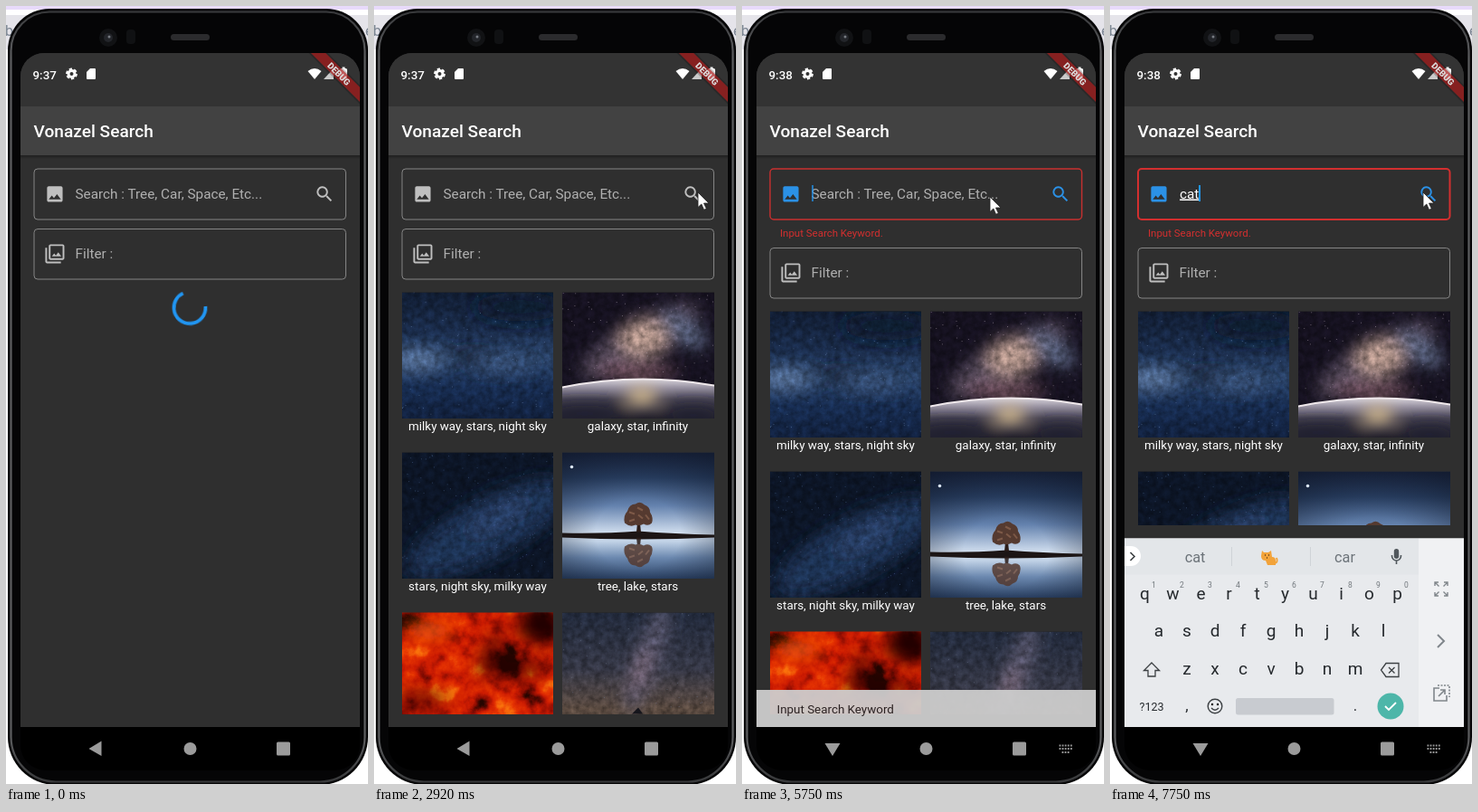
These frames come from a looping animation (400 px wide and 860 px high, 8 s). An HTML page:

```html
<!DOCTYPE html>
<html lang="en">
<head>
<meta charset="utf-8">
<title>Image search app</title>
<style>
html, body { margin: 0; width: 100%; height: 100%; overflow: hidden; background: #fff; }
svg { display: block; }
#stage { width: 100vw; height: 100vh; font-family: Roboto, sans-serif; }
.field { font-size: 15.3px; }
.caption { font-size: 13.4px; fill: #fff; text-anchor: middle; }
.mid { text-anchor: middle; }
.box { fill: none; stroke: #858585; stroke-width: 1; }

/* Percentages are ms / 80 on the 8 s loop */
.t { animation: 8s step-end infinite; }
.spin { animation-name: spin; }
.captions { animation-name: captions; }
.photos { animation-name: photos; }
.mouse { animation-name: mouse; }
.below { animation-name: below; }
.error { animation-name: error; }
.ripple { animation-name: ripple; }
.border { animation-name: border; }
.snack { animation-name: snack; }
.snackText { animation-name: snackText; }
.before38 { animation-name: before38; }
.after38 { animation-name: after38; }
.accent { fill: #bfbfbf; animation-name: accent; }
.navBack { animation-name: navBack; }
.navDown { animation-name: navDown; }
.keyboard { animation-name: keyboard; }
.caret { animation-name: caret; }
.hint { animation-name: hint; }
.typed1 { animation-name: typed1; }
.typed2 { animation-name: typed2; }
.typed3 { animation-name: typed3; }
.words0 { animation-name: words0; }
.words1 { animation-name: words1; }

@keyframes spin {
  0% { transform: rotate(-5deg); stroke-dasharray: 250 110; }
  1% { transform: rotate(42deg); stroke-dasharray: 240 120; }
  2.125% { transform: rotate(95deg); stroke-dasharray: 215 145; }
  3.125% { transform: rotate(145deg); stroke-dasharray: 180 180; }
  6.25%, 100% { opacity: 0; }
}
@keyframes captions { 0% { opacity: 0 } 6.25% { opacity: 1 } }
@keyframes photos { 0% { opacity: 0 } 12.5% { opacity: 1 } }
@keyframes below { 42.75%, 100% { transform: translateY(21px) } }
@keyframes error {
  0% { opacity: 0; transform: translateY(-1.5px) }
  42.75% { opacity: .8; transform: translateY(-1.5px) }
  43.75% { opacity: 1; transform: none }
}
@keyframes ripple { 0% { opacity: 0 } 42.75% { opacity: 1 } 43.75% { opacity: .45 } 44.75%, 100% { opacity: 0 } }
@keyframes border {
  42.75% { stroke: #c9302f; stroke-width: 1 }
  71.875% { stroke: #c9302f; stroke-width: 1.4 }
  72.875%, 100% { stroke: #d32f2f; stroke-width: 2 }
}
@keyframes snack {
  0% { opacity: 0; transform: translateY(5px) }
  42.75% { opacity: 1; transform: translateY(5px) }
  43.75% { opacity: 1; transform: none }
  72.875%, 100% { opacity: 0 }
}
@keyframes snackText { 0% { opacity: 0 } 43.75% { opacity: .6 } 44.75% { opacity: 1 } }
@keyframes before38 { 47.875%, 100% { opacity: 0 } }
@keyframes after38 { 0% { opacity: 0 } 47.875% { opacity: 1 } }
@keyframes accent { 70.875%, 100% { fill: #2b91e6 } }
@keyframes navBack { 71.875%, 100% { opacity: 0 } }
@keyframes navDown { 0% { opacity: 0 } 71.875% { opacity: 1 } }
@keyframes keyboard {
  0% { opacity: 0 }
  72.875% { opacity: 1; transform: translateY(90px) }
  74% { opacity: 1; transform: translateY(24px) }
  75% { opacity: 1; transform: none }
}
@keyframes caret {
  0% { opacity: 0 }
  70.875% { opacity: 1; transform: none }
  71.875% { opacity: .7; transform: none }
  74% { opacity: 0; transform: none }
  77.125% { opacity: 1; transform: none }
  82.25% { opacity: 1; transform: translateX(8px) }
  83.375% { opacity: 1; transform: translateX(16px) }
  84.375% { opacity: 1; transform: translateX(21px) }
  89.625% { opacity: 0; transform: translateX(21px) }
  95.875%, 100% { opacity: 1; transform: translateX(21px) }
}
@keyframes hint { 82.25%, 100% { opacity: 0 } }
@keyframes typed1 { 0% { opacity: 0 } 82.25% { opacity: 1 } 83.375%, 100% { opacity: 0 } }
@keyframes typed2 { 0% { opacity: 0 } 83.375% { opacity: 1 } 84.375%, 100% { opacity: 0 } }
@keyframes typed3 { 0% { opacity: 0 } 84.375% { opacity: 1 } }
@keyframes words0 { 80.25%, 100% { opacity: 0 } }
@keyframes words1 { 0% { opacity: 0 } 80.25% { opacity: 1 } 83.375%, 100% { opacity: 0 } }
@keyframes mouse {
  0% { transform: translate(420px, 150px) }
  27.125% { transform: translate(392px, 176px) }
  28.125% { transform: translate(384px, 182px) }
  29.125% { transform: translate(374px, 191px) }
  30.25% { transform: translate(364px, 200px) }
  31.25% { transform: translate(358px, 205px) }
  33.375% { transform: translate(358px, 206px) }
  61.5% { transform: translate(346px, 208px) }
  62.5% { transform: translate(316px, 211px) }
  63.5% { transform: translate(287px, 212px) }
  64.625% { transform: translate(274px, 211px) }
  91.625% { transform: translate(300px, 214px) }
  92.75% { transform: translate(336px, 218px) }
  93.75% { transform: translate(364px, 216px) }
  95.875% { transform: translate(351px, 209px) }
  96.875%, 100% { transform: translate(346px, 206px) }
}
</style>
</head>
<body>
<svg id="stage" viewBox="0 0 400 860">
<defs>
  <clipPath id="screen"><path d="M16 797V78a26 26 0 0 1 26-26H365a26 26 0 0 1 26 26V797z"/></clipPath>
  <clipPath id="list"><rect x="16" y="290" width="375" height="493"/></clipPath>
  <filter id="soft" x="-60%" y="-60%" width="220%" height="220%"><feGaussianBlur stdDeviation="9"/></filter>
  <filter id="grain" x="0" y="0" width="100%" height="100%" color-interpolation-filters="sRGB">
    <feTurbulence type="fractalNoise" baseFrequency=".14" numOctaves="4" seed="4"/>
    <feColorMatrix values="1 0 0 0 0 1 0 0 0 0 1 0 0 0 0 0 0 0 0 1" result="n"/>
    <feComposite in="SourceGraphic" in2="n" operator="arithmetic" k1=".8" k2=".6"/>
  </filter>
  <filter id="fire" x="0" y="0" width="100%" height="100%" color-interpolation-filters="sRGB">
    <feTurbulence type="fractalNoise" baseFrequency=".03" numOctaves="5" seed="9"/>
    <feColorMatrix values="1.8 0 0 0 -.4 1.8 0 0 0 -.4 1.8 0 0 0 -.4 0 0 0 0 1"/>
    <feComponentTransfer>
      <feFuncR type="table" tableValues=".15 .55 .8 .9 .98"/>
      <feFuncG type="table" tableValues=".02 .05 .11 .2 .45"/>
      <feFuncB type="table" tableValues="0 .01 .01 .01 .05"/>
    </feComponentTransfer>
  </filter>
  <linearGradient id="rim" x2="0" y2="1"><stop stop-color="#3a3b3d"/><stop offset=".06" stop-color="#5d5e60"/><stop offset=".94" stop-color="#5d5e60"/><stop offset="1" stop-color="#38393b"/></linearGradient>
  <linearGradient id="milky" x2="0" y2="1"><stop stop-color="#111d33"/><stop offset=".3" stop-color="#1a2c4b"/><stop offset=".52" stop-color="#2a4266"/><stop offset=".75" stop-color="#172c50"/><stop offset="1" stop-color="#11203d"/></linearGradient>
  <linearGradient id="planet" x2="0" y2="1"><stop stop-color="#d6d2da"/><stop offset=".22" stop-color="#9690a0"/><stop offset=".5" stop-color="#4c4858"/><stop offset="1" stop-color="#1c1a26"/></linearGradient>
  <linearGradient id="sky" x2="0" y2="1"><stop stop-color="#1b2743"/><stop offset=".2" stop-color="#2c4469"/><stop offset=".42" stop-color="#6482ae"/><stop offset=".64" stop-color="#d3e0f0"/><stop offset=".7" stop-color="#c3d4e8"/><stop offset=".83" stop-color="#6c89b0"/><stop offset="1" stop-color="#2a4164"/></linearGradient>
  <radialGradient id="vignette" cx=".5" cy=".64" r=".8"><stop offset=".35" stop-color="#0d1424" stop-opacity="0"/><stop offset="1" stop-color="#0d1424" stop-opacity=".6"/></radialGradient>
  <linearGradient id="dusk" x2="0" y2="1"><stop stop-color="#222a3c"/><stop offset=".45" stop-color="#353745"/><stop offset=".76" stop-color="#5a4a40"/><stop offset="1" stop-color="#2b2524"/></linearGradient>
  <linearGradient id="shade" x2="0" y2="1"><stop stop-color="#000" stop-opacity=".35"/><stop offset="1" stop-color="#000" stop-opacity="0"/></linearGradient>
  <path id="imageIcon" d="M21 19V5c0-1.1-.9-2-2-2H5c-1.1 0-2 .9-2 2v14c0 1.1.9 2 2 2h14c1.1 0 2-.9 2-2zM8.5 13.5l2.5 3.01L14.5 12l4.5 6H5z"/>
  <path id="searchIcon" d="M15.5 14h-.79l-.28-.27A6.5 6.5 0 1 0 13.73 14.43l.27.28v.79l5 4.99L20.49 19zm-6 0a4.5 4.5 0 1 1 0-9 4.5 4.5 0 0 1 0 9z"/>
  <path id="filterIcon" d="M15.96 10.29l-2.75 3.54-1.96-2.36L8.5 15h11zM3 5H1v16c0 1.1.9 2 2 2h16v-2H3zM21 1H7c-1.1 0-2 .9-2 2v14c0 1.1.9 2 2 2h14c1.1 0 2-.9 2-2V3c0-1.1-.9-2-2-2zm0 16H7V3h14z"/>
</defs>

<!-- Desktop behind the phone -->
<rect width="400" height="860" fill="#fff"/>
<rect width="400" height="4" fill="#e8dafb"/>
<rect y="10" width="400" height="38" fill="#e5e4ea"/>
<text x="-1" y="33" font-size="16" fill="#7b8592">b</text>
<text x="397" y="33" font-size="16" fill="#7b8592">e</text>

<!-- Phone body -->
<path d="M2 49A46 46 0 0 1 48 3H354A46 46 0 0 1 400 49V808A53 53 0 0 1 347 861H55A53 53 0 0 1 2 808z" fill="#060607"/>
<path d="M5.500 50A43 43 0 0 1 48 6.500H354A43 43 0 0 1 396.500 50V808A50 50 0 0 1 347 857.500H55A50 50 0 0 1 5.500 808z" fill="#050506" stroke="url(#rim)" stroke-width="2.200"/>
<circle cx="113" cy="35" r="10" fill="#111214"/><circle cx="113" cy="35" r="5" fill="#23252a"/><circle cx="114" cy="34" r="1.500" fill="#777b82"/>
<rect x="133" y="26" width="10" height="16" rx="4" fill="#101113"/>
<rect x="182" y="31" width="43" height="7" rx="3.500" fill="#2b2b2d"/>

<g clip-path="url(#screen)">
  <rect x="16" y="52" width="375" height="745" fill="#2f2f2f"/>
  <rect x="16" y="52" width="375" height="59" fill="#333"/>
  <rect x="16" y="111" width="375" height="54" fill="#424242"/>
  <rect x="16" y="165" width="375" height="4" fill="url(#shade)"/>

  <!-- Status bar -->
  <g fill="#fff">
    <g font-size="13.400" font-weight="500">
      <text class="t before38" x="29.500" y="80.500">9:37</text>
      <text class="t after38" x="29.500" y="80.500">9:38</text>
    </g>
    <circle cx="72.500" cy="75" r="3.500" fill="none" stroke="#fff" stroke-width="3"/>
    <circle cx="72.500" cy="75" r="5.400" fill="none" stroke="#fff" stroke-width="2" pathLength="12" stroke-dasharray="1.200 .8"/>
    <path d="M93 69h5q1 0 1 1v10q0 1-1 1h-8q-1 0-1-1V73z"/>
    <path d="M333.500 72q7.500-6 15 0l-7.500 9z"/>
    <path d="M351 81l11-12v12z" opacity=".75"/>
    <rect x="369" y="69" width="8" height="12" rx="1.500"/><rect x="371.500" y="67.500" width="3" height="2"/>
  </g>
  <g transform="translate(368 75) rotate(45)">
    <rect x="-45" y="-7.500" width="90" height="15" fill="#000" opacity=".2"/>
    <rect x="-45" y="-5.800" width="90" height="11.500" fill="#b71c1c" opacity=".66"/>
    <text class="mid" y="3.500" font-size="9.700" font-weight="900" fill="#ddd">DEBUG</text>
  </g>
  <text x="30.500" y="145" font-size="19.100" font-weight="500" fill="#fff">Vonazel Search</text>

  <!-- Search field -->
  <rect class="t box border" x="31" y="180" width="344.500" height="56" rx="4"/>
  <g class="t accent" transform="translate(42.500 196.500) scale(.955)"><use href="#imageIcon"/></g>
  <g class="t accent" transform="translate(340.500 196.500) scale(.955)"><use href="#searchIcon"/></g>
  <circle class="t ripple" cx="352" cy="208" r="33" fill="#fff" fill-opacity=".065"/>
  <g class="field">
    <text class="t hint" x="76.500" y="213" fill="#b0b0b0">Search : Tree, Car, Space, Etc...</text>
    <g fill="#fff" text-decoration="underline">
      <text class="t typed1" x="77" y="212.500">c</text>
      <text class="t typed2" x="77" y="212.500">ca</text>
      <text class="t typed3" x="77" y="212.500">cat</text>
    </g>
  </g>
  <rect class="t caret" x="77" y="198" width="2" height="18" fill="#2196f3"/>
  <text class="t error" x="42" y="255" font-size="11.460" fill="#d32f2f">Input Search Keyword.</text>

  <g class="t below">
    <rect class="box" x="31" y="246.500" width="344.500" height="55.500" rx="4"/>
    <use href="#filterIcon" fill="#bfbfbf" transform="translate(42.500 262.500) scale(.955)"/>
    <text class="field" x="76.500" y="279" fill="#b0b0b0">Filter :</text>
  </g>
  <g transform="translate(203 333.500)">
    <circle class="t spin" r="17.500" pathLength="360" fill="none" stroke="#2196f3" stroke-width="3.800"/>
  </g>

  <!-- Results -->
  <g clip-path="url(#list)"><g class="t below">
    <g class="t captions" id="captions"></g>
    <g class="t photos">
      <svg x="31" y="316.500" width="167" height="139.500">
        <g filter="url(#grain)">
          <rect width="167" height="140" fill="url(#milky)"/>
          <g filter="url(#soft)">
            <ellipse cx="16" cy="75" rx="30" ry="11" fill="#587299"/>
            <ellipse cx="112" cy="80" rx="34" ry="7" fill="#3a5279"/>
            <ellipse cx="72" cy="70" rx="22" ry="7" fill="#161d2e"/>
            <ellipse cx="130" cy="16" rx="50" ry="16" fill="#101b30"/>
          </g>
        </g>
        <path class="stars" data-count="80" stroke="#6a86b2"/>
      </svg>
      <svg x="208" y="316.500" width="168" height="139.500">
        <g filter="url(#grain)">
          <rect width="168" height="140" fill="#15111f"/>
          <g filter="url(#soft)">
            <ellipse cx="86" cy="54" rx="74" ry="22" fill="#55485a" transform="rotate(-30 86 54)"/>
            <ellipse cx="134" cy="42" rx="30" ry="13" fill="#56607c" transform="rotate(35 134 42)"/>
            <ellipse cx="90" cy="50" rx="27" ry="20" fill="#b3958a"/>
            <ellipse cx="84" cy="88" rx="44" ry="7" fill="#7d5762"/>
          </g>
        </g>
        <path class="stars" data-count="110" stroke="#b8a9b8"/>
        <path d="M0 105Q84 88 168 103V140H0z" fill="url(#planet)"/>
        <g filter="url(#soft)">
          <ellipse cx="25" cy="134" rx="48" ry="12" fill="#242131"/><ellipse cx="145" cy="136" rx="34" ry="12" fill="#242131"/>
          <ellipse cx="88" cy="115" rx="18" ry="9" fill="#e3c692"/>
        </g>
        <path d="M0 105Q84 88 168 103" fill="none" stroke="#f0e9ec" stroke-width="2"/>
      </svg>
      <svg x="31" y="493.500" width="167" height="139.500">
        <g filter="url(#grain)">
          <rect width="167" height="140" fill="#0c1526"/>
          <g filter="url(#soft)">
            <ellipse cx="95" cy="84" rx="100" ry="32" fill="#1c3052" transform="rotate(-28 95 84)"/>
            <ellipse cx="105" cy="72" rx="40" ry="11" fill="#2a4168" transform="rotate(-28 105 72)"/>
          </g>
        </g>
        <path class="stars" data-count="130" stroke="#4f6c9b"/>
      </svg>
      <svg x="208" y="493.500" width="168" height="139.500">
        <rect width="168" height="140" fill="url(#sky)"/>
        <rect width="168" height="140" fill="url(#vignette)"/>
        <path d="M0 89q45 1 84-2 40 3 84 4v3Q85 98 0 94z" fill="#1c1515"/>
        <circle cx="10.500" cy="16" r="1.800" fill="#dbe6f5"/>
        <g id="tree">
          <path d="M82 88l1.500-14h2l1.500 14z" fill="#2b1c18"/>
          <path d="M69 78q-2-8 3-13 2-8 9-8 5-4 10 1 6 2 6 8 4 6 2 12-4 4-9 1-5 3-9 1-6 3-12-2z" fill="#553a30"/>
          <path d="M74 66l6 2m3-7l6 3m3 5l4 5m-22 2l6-2m4-5l5 4" stroke="#7d5947" stroke-width="2"/>
        </g>
        <use href="#tree" transform="translate(0 182) scale(1 -1)" opacity=".85"/>
      </svg>
      <svg x="31" y="670.500" width="167" height="139.500">
        <rect width="167" height="140" filter="url(#fire)"/>
        <g filter="url(#soft)" fill="#230602">
          <ellipse cx="154" cy="14" rx="26" ry="20"/>
          <ellipse cx="98" cy="46" rx="8" ry="26" transform="rotate(25 98 46)" opacity=".8"/>
          <ellipse cx="124" cy="62" rx="36" ry="8" opacity=".75"/>
          <ellipse cx="20" cy="96" rx="30" ry="9" opacity=".6"/>
          <ellipse cx="30" cy="20" rx="26" ry="9" fill="#f26a10" opacity=".8"/>
        </g>
      </svg>
      <svg x="208" y="670.500" width="168" height="139.500">
        <g filter="url(#grain)">
          <rect width="168" height="140" fill="url(#dusk)"/>
          <g filter="url(#soft)" transform="rotate(20 92 56)"><ellipse cx="92" cy="50" rx="13" ry="62" fill="#57546b"/><ellipse cx="90" cy="66" rx="6" ry="26" fill="#806a78"/></g>
        </g>
        <path class="stars" data-count="60" stroke="#6f7890"/>
        <path d="M77 112l7-7 5 7z" fill="#15151c"/>
      </svg>
    </g>
  </g></g>

  <g class="t snack">
    <rect x="16" y="756" width="375" height="60" fill="#cdcdcd" fill-opacity=".95"/>
    <text class="t snackText" x="38.500" y="781.500" font-size="13.400" fill="#2b2222">Input Search Keyword</text>
  </g>

  <!-- Soft keyboard -->
  <g class="t keyboard">
    <rect x="16" y="574" width="375" height="15" fill="#2f2f2f"/>
    <rect x="16" y="588.500" width="375" height="210" fill="#e8eaed"/>
    <rect x="16" y="588.500" width="325" height="40" fill="#e3e6e9"/>
    <rect x="341" y="588.500" width="50" height="210" fill="#f0f1f3"/>
    <path d="M16 597h7a11 11 0 0 1 0 22h-7z" fill="#fff"/>
    <path d="M134.500 598v21M221.500 598v21" stroke="#cfd3d7"/>
    <g fill="none" stroke="#3c4043" stroke-width="1.600">
      <path d="M22.500 604l4.500 4.500-4.500 4.500"/>
      <path d="M311.500 607v1a5 5 0 0 0 10 0v-1M316.500 613v4" stroke="#50575c"/>
      <path d="M46 726l8.500 8.500H50V741h-8v-6.500h-4.500zM305 726.500h14v15h-14l-5.500-7.500zM308 731l6.500 6.500m0-6.500L308 737.500" stroke-width="1.300"/>
      <circle cx="116" cy="774" r="7.800" stroke-width="1.400"/><path d="M112 776q4 4.500 8 0" stroke-width="1.300"/>
      <path d="M362 695l7 7-7 7" stroke="#80868b" stroke-width="2"/>
      <path d="M359 641v-4h4m6 0h4v4m0 7v4h-4m-6 0h-4v-4m0-11l4.500 4.500m9.500-4.500l-4.500 4.500m4.500 10.500l-4.500-4.500m-9.500 4.500l4.500-4.500" stroke="#80868b" stroke-width="1.400"/>
      <path d="M364 754h-6v14h14v-6M363 763l7-7m-5 0h5v5" stroke="#80868b"/>
      <path d="M362 751h13v13" stroke="#80868b" stroke-dasharray="2 1.500"/>
    </g>
    <rect x="313.800" y="600" width="5.400" height="11" rx="2.700" fill="#50575c"/>
    <circle cx="113" cy="772" r="1.200"/><circle cx="119" cy="772" r="1.200"/>
    <rect x="139" y="765" width="108.500" height="18.500" rx="2.500" fill="#c8cbd0"/>
    <circle cx="310" cy="774" r="14.500" fill="#4db6a9"/>
    <path d="M304 774l4 4 8-8" fill="none" stroke="#fff" stroke-width="1.800"/>
    <g class="mid" fill="#6b7278" font-size="16.300" id="words">
      <g class="t typed3" fill="#f2a33a">
        <path d="M168 602l2 2h5l3-2 1 7q4 0 4 4v5h-9l-2-5q-5 0-5-5z"/>
        <path d="M182 616q4-1 2-6" fill="none" stroke="#f2a33a" stroke-width="2"/>
        <path d="M171 607h1m3 0h1m-3 3h1" stroke="#5c3a18" stroke-width="1.500"/>
      </g>
    </g>
    <g class="mid" fill="#25292d" id="keys"></g>
  </g>
</g>

<!-- Navigation bar -->
<path d="M16 797H391V817a28 28 0 0 1-28 28H44a28 28 0 0 1-28-28z"/>
<g fill="#9b9b9b">
  <path class="t navBack" d="M91.500 821L105.500 812.500V829z"/>
  <g class="t navDown">
    <path d="M91.500 815H108.500L100 829z"/>
    <path d="M350.500 817.500h15M350.500 821h15M353.500 825h9" stroke="#9b9b9b" stroke-width="1.800" stroke-dasharray="1.800 1.300"/>
  </g>
  <circle cx="203.500" cy="821" r="7"/>
  <rect x="299" y="813.500" width="15" height="15" rx="1.500"/>
</g>

<g class="t mouse"><path d="M0 0V16.500L3.800 13 6.600 19.300 9.300 18 6.500 12H12z" fill="#fff" stroke="#222" stroke-width=".8"/></g>
</svg>
<script>
const $ = selector => document.querySelector(selector);

function addText(parent, text, x, y, attrs = {}) {
  const el = document.createElementNS("http://www.w3.org/2000/svg", "text");
  for (const [key, value] of Object.entries({ x, y, ...attrs })) el.setAttribute(key, value);
  el.textContent = text;
  parent.append(el);
}

const captions = ["milky way, stars, night sky", "galaxy, star, infinity", "stars, night sky, milky way", "tree, lake, stars"];
captions.forEach((text, i) =>
  addText($("#captions"), text, i % 2 ? 291.5 : 114.5, 469 + 177 * (i >> 1), { class: "caption" }));

const rows = [["qwertyuiop", 38.5, 656], ["asdfghjkl", 54, 697], ["zxcvbnm", 85, 739]];
for (const [letters, x, y] of rows) {
  [...letters].forEach((letter, i) => {
    addText($("#keys"), letter, x + 31 * i, y, { "font-size": 19 });
    if (y === 656) addText($("#keys"), (i + 1) % 10, x + 31 * i + 10, 643, { "font-size": 8.5, fill: "#70767b" });
  });
}
addText($("#keys"), "?123", 46, 778.5, { "font-size": 12.5 });
addText($("#keys"), ",", 85, 779, { "font-size": 17 });
addText($("#keys"), ".", 271, 779, { "font-size": 17 });

const suggestions = { words0: ["thanks", "I", "we"], words1: ["can", "c", "call"], typed2: ["can", "ca", "car"], typed3: ["cat", "", "car"] };
for (const [name, words] of Object.entries(suggestions)) {
  words.forEach((word, i) => addText($("#words"), word, [94, 177, 259.5][i], 615, { class: "t " + name }));
}

let seed = 7;
const random = () => (seed = seed * 16807 % 2147483647) / 2147483647;
for (const path of document.querySelectorAll(".stars")) {
  let d = "";
  for (let i = 0; i < +path.dataset.count; i++) d += `M${(random() * 167).toFixed(1)} ${(random() * 139).toFixed(1)}h1`;
  path.setAttribute("d", d);
  path.setAttribute("opacity", .5);
}
</script>
</body>
</html>
```
